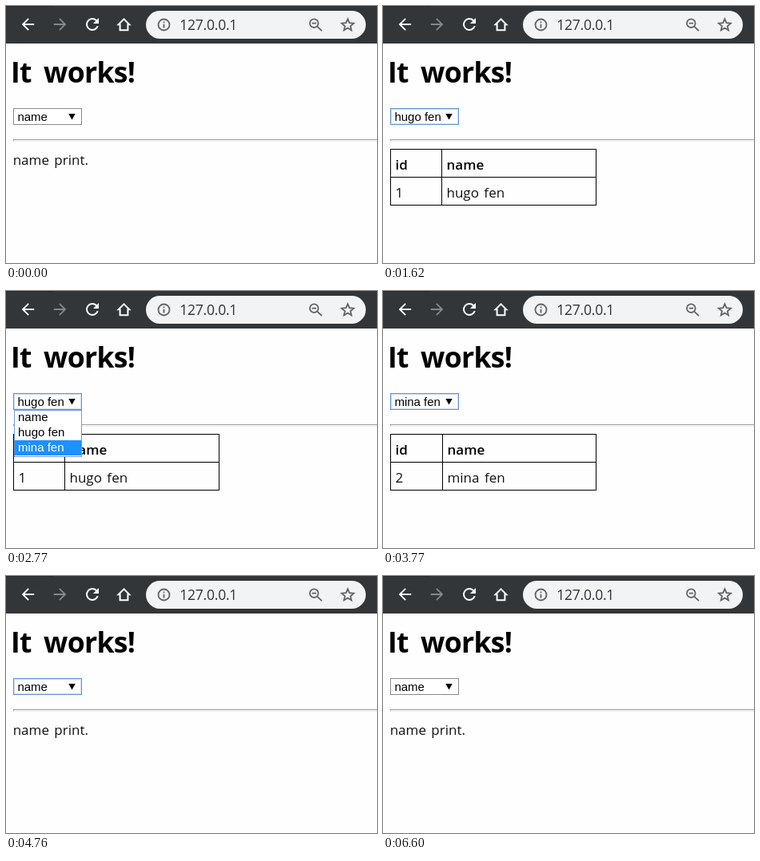
Recreate the animation shown at these times as an HTML page. Size 464 px wide and 322 px high, loop 6.7 s.

```html
<!DOCTYPE html>
<html lang="en">
<head>
<meta charset="utf-8">
<title>It works!</title>
<style>
html, body { margin: 0; width: 100%; height: 100%; overflow: hidden; background: #fefefe; }
svg { display: block; width: 464px; height: 322px; }
text { font-family: "Open Sans", "Noto Sans", sans-serif; font-size: 17px; word-spacing: 2px; fill: #111; white-space: pre; }
.ui { font-family: "Liberation Sans", Arial, sans-serif; font-size: 15px; word-spacing: 0; fill: #000; }
.bold { font-weight: 600; fill: #000; }
.title { font-size: 35.5px; font-weight: 700; letter-spacing: -.7px; word-spacing: 6.8px; fill: #000; }
.url { font-size: 17.5px; letter-spacing: -.25px; fill: #333; }
.icon { fill: none; stroke: #5f6368; stroke-width: 1.8; }
.line { fill: none; stroke: #000; }
.line, .crisp { shape-rendering: crispEdges; }
</style>
</head>
<body>
<svg viewBox="0 0 464 322">
  <defs>
    <path id="arrow" d="M7.7-1H-4.2L1.3-6.5 0-7.8-7.8 0 0 7.8 1.3 6.5-4.2 1H7.7z"/>
  </defs>
  <rect width="464" height="47" fill="#323639"/>
  <rect width="60" height="1" fill="#25282a"/>
  <rect x="175" y="6" width="275" height="35" rx="17.5" fill="#f1f3f4"/>
  <g fill="#fff">
    <use href="#arrow" x="27.5" y="23"/>
    <use href="#arrow" transform="translate(67.5 23) scale(-1 1)" fill="#85888a"/>
    <path transform="translate(96 11)" d="M17.65 6.35A8 8 0 1 0 19.73 14h-2.08A6 6 0 1 1 16.22 7.78L13 11h7V4z"/>
    <path d="M140.6 23.3L147.5 16.3 154.4 23.3H152.4V30.3H142.6V23.3Z" fill="none" stroke="#fff" stroke-width="2"/>
  </g>
  <g class="icon">
    <circle cx="197.5" cy="23.5" r="7"/>
    <path d="M197.5 19.5V21.3M197.5 22.7V27.5"/>
    <circle cx="385.3" cy="21.7" r="5.3"/>
    <path d="M389.2 25.6L395 31.2M382.7 21.7H388"/>
    <path d="M427.4 16.2L429.5 21.1 434.9 21.6 430.8 25.2 432 30.4 427.4 27.6 422.8 30.4 424 25.2 419.9 21.6 425.3 21.1Z"/>
  </g>
  <text class="url" x="217.3" y="29.5">127.0.0.1</text>

  <text class="title" x="6" y="95.5">It works!</text>

  <g class="crisp">
    <path d="M9 167H464V168H10V169H9Z" fill="#9a9a9a"/>
    <path d="M10 169H464V170H9V169Z" fill="#ececec"/>
  </g>

  <text id="print" x="8.7" y="199">name print.</text>
  <g id="table">
    <path class="line" d="M9.5 179.5H266.5V249.5H9.5ZM9.5 214.5H266.5"/>
    <path class="line" id="divider" d="M73.5 179.5V249.5"/>
    <text class="bold" x="15.5" y="205">id</text>
    <text class="bold" id="head" y="205">name</text>
    <text id="rowId" x="15.5" y="240"></text>
    <text id="rowName" y="240"></text>
  </g>

  <rect x="9.5" y="128.5" width="85" height="20" fill="#fff" stroke="#8a8a8a"/>
  <g id="focus" class="crisp" fill="none" stroke="#5f93de">
    <rect x="9.5" y="128.5" width="85" height="20"/>
    <rect x="10.5" y="129.5" width="83" height="18" opacity=".3"/>
  </g>
  <text class="ui" id="value" x="14.4" y="144"></text>
  <path d="M78.3 135H86.7L82.5 142.6Z"/>

  <g id="menu">
    <rect x="10.5" y="149.5" width="84" height="58" fill="#fff" stroke="#6f9fe0"/>
    <rect id="mark" x="11" width="83" height="19" fill="#1e90ff"/>
    <g id="items"></g>
  </g>
</svg>
<script>
const LOOP = 6700;
const BLUR = 6600;
const NAMES = ["name", "hugo fen", "mina fen"];
const $ = id => document.getElementById(id);
const show = (el, on) => el.setAttribute("visibility", on ? "visible" : "hidden");

const items = NAMES.map((name, i) => {
  const item = document.createElementNS("http://www.w3.org/2000/svg", "text");
  item.setAttribute("class", "ui");
  item.setAttribute("x", 15);
  item.setAttribute("y", 163 + 19 * i);
  item.textContent = name;
  return $("items").appendChild(item);
});

// Each visit to the menu: open and close time, fade steps, highlighted rows
const VISITS = [
  { open: 720, close: 1620, fade: [.35, .7], step: 20, marks: [[720, 0], [1110, 1]] },
  { open: 2400, close: 3160, fade: [.5], step: 30, marks: [[2400, 1], [2590, 2]] },
  { open: 3970, close: 4760, fade: [.5], step: 30, marks: [[3970, 2], [4220, 0]] }
];

function draw(t) {
  const past = VISITS.filter(v => t >= v.close).pop();
  const picked = past ? past.marks[1][1] : 0;
  const visit = VISITS.find(v => t >= v.open && t < v.close);

  $("value").textContent = NAMES[picked];
  show($("focus"), t >= VISITS[0].open && t < BLUR);
  show($("print"), !picked);
  show($("table"), picked);

  const shift = picked === 2 ? 1 : 0;
  $("divider").setAttribute("transform", `translate(${shift})`);
  $("head").setAttribute("x", 79.5 + shift);
  $("rowName").setAttribute("x", 79.5 + shift);
  $("rowId").textContent = picked || "";
  $("rowName").textContent = picked ? NAMES[picked] : "";

  show($("menu"), visit);
  if (!visit) return;
  const row = visit.marks.filter(m => t >= m[0]).pop()[1];
  const alpha = visit.fade[Math.floor((t - visit.open) / visit.step)] ?? 1;
  $("menu").setAttribute("opacity", alpha);
  $("mark").setAttribute("y", 149 + 19 * row);
  items.forEach((item, i) => item.style.fill = i === row ? "#fff" : "#000");
}

const start = performance.now();
function tick(now) {
  draw(Math.max(0, now - start) % LOOP);
  requestAnimationFrame(tick);
}
draw(0);
requestAnimationFrame(tick);
</script>
</body>
</html>
```
